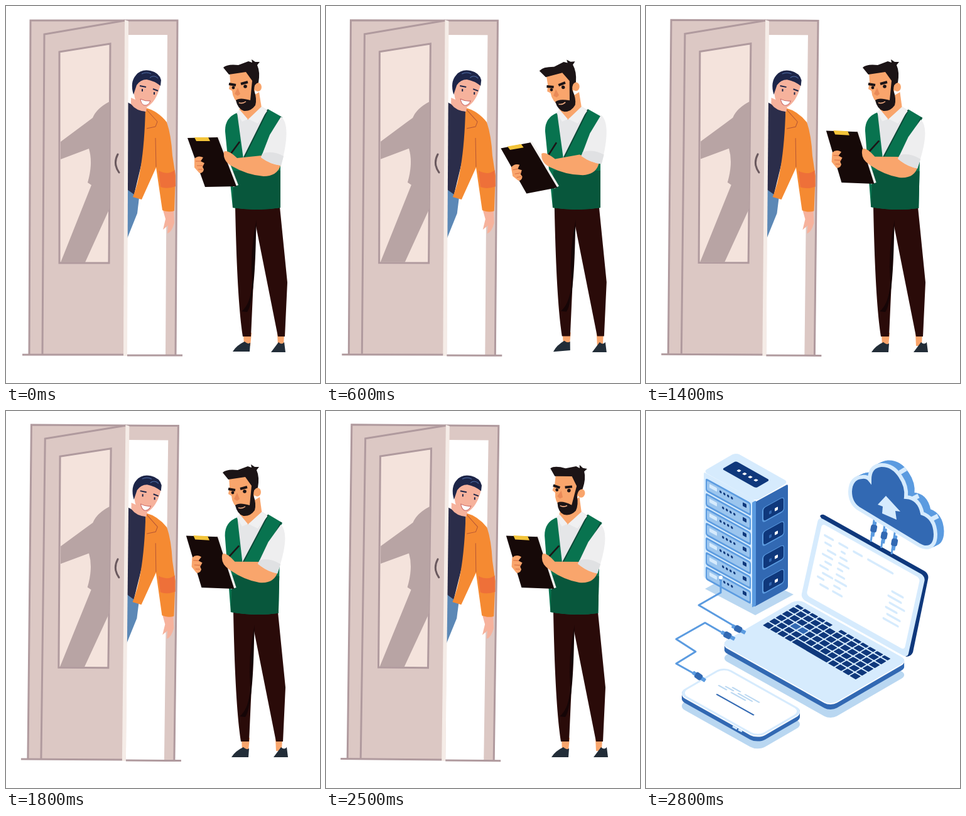
Recreate the animation shown at these times as an HTML page. Size 500 px wide and 600 px high, loop 3500 ms.

```html
<!DOCTYPE html>
<html lang="en">
<head>
<meta charset="utf-8">
<title>Office door and data upload</title>
<style>
html, body { margin: 0; width: 100%; height: 100%; overflow: hidden; background: #fff; }
svg { display: block; width: 100%; height: 100%; }
.trim { stroke: #b09a9e; stroke-width: 3; }
.line { fill: none; }
.wall { fill: #dcc8c4; }
.skin { fill: #f9a56c; }
.rosy { fill: #f6b29c; }
.ink { fill: #1c1416; }
.cable { fill: none; stroke: #5b9be0; stroke-width: 3; stroke-linejoin: round; }
.pale { fill: #d6ebfd; }
.soft { fill: #9bc5ee; }
.blue { fill: #5b9be0; }
.mid { fill: #3269b3; }
.deep { fill: #0f387c; }
.shade { fill: #b9d7f1; }
.white { fill: #fff; }
</style>
</head>
<body>
<svg viewBox="0 0 500 600" preserveAspectRatio="none">
<g id="office">
  <g id="door">
    <path class="wall" d="M38 22H274L271 555H254L257 46H193V555H37Z"/>
    <path class="trim line" d="M37 555L39 23H273L270 555"/>
    <!-- visitor -->
    <path fill="#5c88b6" d="M193 290L212 305L209 330L193 370Z"/>
    <path fill="#2b2d4a" d="M193 153L222 168V225L204 300L193 292Z"/>
    <path class="rosy" d="M250 325H267L268 345Q264 360 257 362L258 349L250 356L254 339Z"/>
    <path fill="#f58a32" d="M222 162Q242 167 256 185Q263 205 265 238L270 270L268 326Q259 329 249 325L239 257L216 308L202 304Q220 260 222 162Z"/>
    <path fill="#ee7039" d="M243 262Q258 270 269 261L270 287Q256 292 246 288Z"/>
    <path class="line" stroke="#b75635" d="M222 163L241 184L238 192L224 195M238 210L239 256"/>
    <path class="rosy" d="M199 146L225 157L223 168Q207 167 199 156Z"/>
    <path class="rosy" d="M204 122Q202 140 207 152Q214 163 224 161Q240 152 246 125L236 113L214 112Z"/>
    <path fill="#1d2548" d="M203 141Q197 121 207 110Q215 100 230 103Q244 106 247 118L246 127Q236 119 224 117Q214 117 208 126Z"/>
    <path class="line" stroke="#506ea8" d="M216 108Q224 104 231 108M229 114Q236 109 242 115"/>
    <path class="line" stroke="#1d2548" stroke-width="2" d="M213 127L223 129M234 132L242 135M217 132V136M236 137V141"/>
    <path class="white" stroke="#c96664" d="M214 148Q222 152 230 151Q227 159 220 158Q215 156 214 148Z"/>
    <!-- open leaf -->
    <path class="wall" d="M61 45L190 22L189 555H58Z"/>
    <path class="trim line" d="M58 554L61 45L190 23"/>
    <path fill="#f5ece7" d="M189 22L195 24L193 557H187Z"/>
    <path class="trim" fill="#f4e3dc" d="M85 73L166 60L164 409H85Z"/>
    <path fill="#b8a4a4" d="M165 152Q144 163 138 178L126 187L87 216V244L132 227Q139 250 130 281L136 285L87 408H126L165 322Z"/>
    <path class="line" stroke="#6a595e" stroke-width="3" stroke-linecap="round" d="M178 236Q170 251 180 265"/>
    <path class="trim line" d="M26 555H187M193 556H281"/>
  </g>

  <g id="legs">
    <path class="skin" d="M378 520H391L389 541H379ZM432 520H443L442 541H433Z"/>
    <path fill="#2a0b09" d="M365 320H436L448 440L444 526H433L398 350L390 526H377Q368 470 365 320Z"/>
    <path fill="#160506" d="M399 340Q388 390 392 440Q390 474 375 486L384 487Q396 470 398 365Z"/>
  </g>
  <g fill="#222d38">
    <path id="footL" d="M361 550Q367 540 380 534Q385 539 389 536L388 550Z"/>
    <path id="footR" d="M422 550L434 534Q439 539 443 534L445 550Z"/>
  </g>
  <g id="torso">
    <path fill="#e5e6e8" d="M367 169L407 160L417 166L378 243Z"/>
    <path fill="#08734f" d="M368 170Q348 178 349 200L361 321Q400 327 437 321V240L414 232L440 177L417 164L378 243Z"/>
    <path fill="#08573c" d="M362 262H437V321Q400 327 361 321Z"/>
    <path class="line" stroke="#0a4937" stroke-width="2" d="M438 176L409 239M417 165L379 241"/>
    <path class="skin" d="M374 155L403 137L407 162L385 181L371 167Z"/>
    <path fill="#f0f0f1" d="M372 165L385 180L376 184L367 170ZM407 160L416 167L401 187L386 180Z"/>
  </g>
  <g id="head">
    <path class="skin" d="M356 104L357 121L355 132L360 135Q361 149 373 157L391 154L400 122L391 103Z"/>
    <ellipse class="skin" cx="401" cy="129" rx="6" ry="7"/>
    <path class="ink" d="M346 98Q352 92 370 94L386 88L392 90L391 85L397 89L404 89L400 94Q405 105 402 122Q395 123 395 134Q400 148 397 158Q390 168 379 167Q369 164 366 150Q372 145 389 150L392 119L382 105L355 109Z"/>
    <path class="line" stroke="#1c1416" stroke-width="4" d="M355 124L366 126M374 124L385 121"/>
    <g class="ink"><circle cx="362" cy="130" r="2.4"/><circle cx="381" cy="128" r="2.8"/></g>
    <path fill="#e98a58" d="M369 130L364 140L369 143L373 140Z"/>
    <path class="line" stroke="#f2ad84" stroke-width="1.6" d="M371 154Q377 156 382 152"/>
  </g>
  <g id="board">
    <path fill="#f4f2f0" d="M335 208H340L370 285L362 288Z"/>
    <path fill="#160908" d="M289 210L337 209L367 287L317 288Z"/>
    <path fill="#f3c43a" d="M300 209H322L325 215H303Z"/>
    <path class="skin" d="M300 243Q306 237 314 241L310 247L316 250L313 256L315 260Q314 266 308 266L300 257Z"/>
    <path class="line" stroke="#d96f43" d="M302 247H310M304 254H314M306 260H313"/>
  </g>
  <g id="arm">
    <path class="line" stroke="#1c1416" stroke-width="2.5" d="M358 235L372 216"/>
    <path class="skin" d="M347 232Q353 228 368 242L407 238L438 250Q434 271 410 271Q384 269 360 255Q345 247 347 232Z"/>
  </g>
  <g id="sleeve">
    <path fill="#eeeeef" d="M438 176Q455 190 438 254Q421 252 406 241L420 205Z"/>
    <path fill="#e0e1e3" d="M408 235Q424 229 442 239L438 254Q421 252 406 241Z"/>
  </g>
</g>
<rect id="veil" width="500" height="600" fill="#fff"/>
<g id="data"></g>
</svg>
<script>
const $ = id => document.getElementById(id);
const rep = (n, f) => Array.from({ length: n }, (_, i) => f(i)).join('');
const rect = (x, y, w, h, cls, r = 1) =>
  `<rect x="${x}" y="${y}" width="${w}" height="${h}" rx="${r}" class="${cls}"/>`;
const path = (d, cls, more = '') => `<path d="${d}" class="${cls}" ${more}/>`;
const plane = (matrix, body) => `<g transform="matrix(${matrix})">${body}</g>`;

// Isometric slab: shadow, side, rim and top share one rounded rectangle
const slab = (x, y, w, h, r, depth, top) => {
  const at = (dy, cls) => plane([1, .56, -1, .58, x, y + dy], rect(0, 0, w, h, cls, r));
  return at(depth * 2.3, 'shade') + rep(depth, i => at(depth - i, 'mid')) + at(2, 'white') + at(0, top);
};

function server() {
  const unit = i => {
    const y = 8 + i * 23.4;
    return rect(3, y, 72, 21, 'blue', 3) + rect(5, y + 3, 68, 15, 'soft', 2) +
      rect(9, y + 6, 12, 6, 'pale') + rect(62, y + 6, 6, 6, 'deep') +
      rep(4, k => rect(25 + k * 6 + i % 2 * 4, y + 7, 3.5, 4, 'deep', 2));
  };
  const vent = i => {
    const y = 16 + i * 38;
    return rect(13, y, 35, 24, 'blue', 5) + rect(15, y + 1, 32, 21, 'deep', 4) +
      rect(24, y + 11, 4, 5, 'mid') + rect(33, y + 11, 5, 5, 'white');
  };
  const roof = rect(0, 0, 84, 52, 'pale', 6) + rect(12, 12, 54, 22, 'deep', 3) +
    rep(4, i => rect(26 + i * 9, 21, 4, 4, 'white'));
  return path('M94 283L150 252L235 292L174 325Z', 'shade') +
    plane([1, .55, 0, 1, 92, 97], rect(0, 0, 82, 168, 'pale', 3) + rep(7, unit)) +
    plane([1, -.55, 0, 1, 172, 146], rect(0, 0, 54, 166, 'mid', 3) + rect(-3, -2, 6, 167, 'blue') + rep(4, vent)) +
    plane([1, .56, -1, .58, 143, 66], roof);
}

function keyboard() {
  const pitch = 13.3;
  const row = v => rep(13, u => {
    const gap = v === 0 && u === 5 || v === 5 && u > 3 && u < 9;
    const lit = v === 3 && (u === 2 || u === 3);
    return gap ? '' : rect(u * pitch, v * 11.8 + (v ? 0 : 4), 11.2, v ? 9.6 : 5.5, lit ? 'mid' : 'deep');
  });
  return plane([.866, .505, -.86, .51, 245, 306], rep(6, row) + rect(4 * pitch, 59, 64, 9.6, 'deep'));
}

function screen() {
  const bar = (x, y, w) => rect(x, y, w, 3.4, 'pale', 1.7);
  const lines = rep(4, i => bar(13 + i * 23, 20, i < 3 ? 16 : 42)) +
    rep(8, i => bar(16 + i % 2 * 6, 30 + i * 9, 12 + i % 3 * 3) + bar(42, 30 + i * 9, 8 + i * 5 % 13)) +
    rep(6, i => bar(126 - i % 2 * 4, 46 + i * 9, 20 + i % 3 * 3));
  return path('M277 167Q280 163 285 166L444 255Q451 260 449 268L425 384Q422 391 414 391Z', 'deep') +
    plane([1, .56, -.22, 1, 275, 168],
      rect(0, 0, 170, 130, 'pale', 7) + rect(7, 7, 156, 114, 'white', 5) + lines);
}

function tablet() {
  const bars = rep(3, i => rect(22 + i * 7, 30 - i * 4, 14, 2, 'shade') + rect(42 + i * 7, 30 - i * 4, 24, 2, 'shade'));
  return slab(124, 406, 128, 74, 12, 9, 'pale') +
    plane([1, .56, -1, .58, 124, 406], rect(3, 3, 122, 68, 'white', 10) + bars + rect(33, 44, 60, 2, 'mid')) +
    path('M138 502L145 506M147 507L153 510', '', 'stroke="#d6ebfd" stroke-width="3"');
}

function cloud() {
  const puff = 'M338 155Q325 146 325 128Q326 106 344 105Q352 104 356 109Q356 88 374 86Q393 85 405 104Q416 120 414 137Q435 138 440 163Q460 170 461 196Q461 217 446 217Q441 217 434 213Z';
  const layer = (x, y, color, w = 5) =>
    path(puff, '', `transform="translate(${x} ${y})" fill="${color}" stroke="#${w > 5 ? 'd6ebfd' : '5b9be0'}" stroke-width="${w}"`);
  return rep(9, i => layer(11 - i * 1.3, -5 + i * .6, '#5b9be0')) +
    path('M404 98L414 92M424 140L434 135M455 172L465 167', '', 'stroke="#d6ebfd" stroke-width="7"') +
    layer(0, 0, '#3269b3', 6) +
    path('M382 135L405 160L397 159L399 173L376 163L377 152L369 149Z', 'pale');
}

const plug = (x, y, turn) => `<g transform="translate(${x} ${y}) rotate(${turn})">` +
  rect(-9, -3, 24, 6, 'blue') + rect(-4, -5, 12, 10, 'mid', 3) + '</g>';

$('data').innerHTML = server() +
  slab(242, 299, 175, 123, 10, 10, 'pale') + keyboard() + screen() + tablet() +
  path('M119 264V289L84 309L140 342M120 352L94 337L48 363L79 383L48 402L82 421', 'cable') +
  '<circle cx="119" cy="265" r="3" fill="#fff"/>' +
  rep(3, i => path(`M${364 + i * 16.5} ${168 + i * 10}l-6 40`, 'cable')) + cloud() +
  rep(3, i => plug(363 + i * 16.5, 185 + i * 11, 100)) +
  plug(145, 346, 28) + plug(128, 356, 28) + plug(82, 421, 34);

const LOOP = 3500, STEP = 100, SWAP = 2800;
const ramp = (t, from, to) => Math.min(1, Math.max(0, (t - from) / (to - from)));

function move(id, px, py, dx, dy, turn = 0, size = 1) {
  $(id).setAttribute('transform',
    `translate(${px + dx} ${py + dy}) rotate(${turn}) scale(${size}) translate(${-px} ${-py})`);
}

function draw(t) {
  const drift = ramp(t, 0, 2400);
  const settle = ramp(t, 1000, 1400);
  const lean = ramp(t, 0, 1000) - settle;
  const look = ramp(t, 2200, 2600);

  move('door', 195, 235, 0, 0, drift / 2);
  move('legs', 400, 325, -2 * lean - 3 * settle, -lean);
  move('footL', 386, 540, -2 * settle, settle - 3 * lean, -8 * lean);
  move('footR', 438, 540, 3 * lean + 4 * settle, 1);
  move('torso', 400, 250, -2 * drift * settle, 0, 1.3 * settle);
  move('head', 392, 160, 2 * look - settle, 0, 12.5 * look - 10 * lean);
  move('board', 368, 286, 2 * lean - 3.5 * settle, 3 * lean - 4 * settle, 3.2 * settle - 16.4 * lean, 1 + .04 * settle);
  move('arm', 428, 262, -3 * lean - 6 * settle, 4 * settle - 5 * lean, 6 * settle - 7 * lean);
  move('sleeve', 428, 185, -settle, 4 * (settle - lean), 4 * settle - lean);

  $('veil').setAttribute('opacity', t < SWAP ? .3 * Math.max(0, (t - 2500) / 100) : 1);
  $('data').setAttribute('visibility', t < SWAP ? 'hidden' : 'visible');
}

function tick() {
  draw(Math.floor(performance.now() % LOOP / STEP) * STEP);
  requestAnimationFrame(tick);
}
tick();
</script>
</body>
</html>
```
